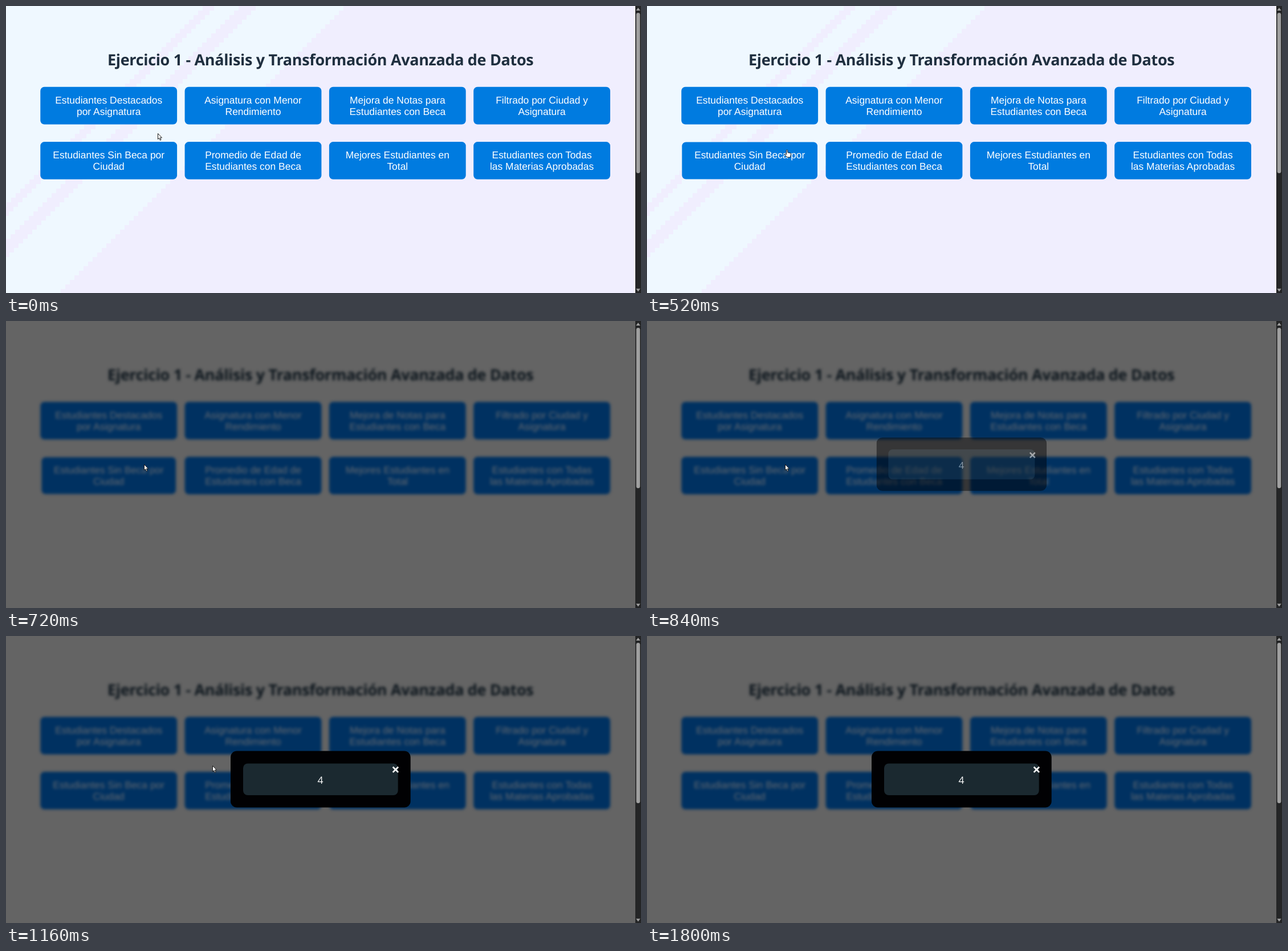
Write an HTML page that moves like this. It is 1114 by 503 pixels and loops after 2.04 s.

```html
<!DOCTYPE html>
<html lang="es">
<head>
<meta charset="utf-8">
<title>Ejercicio 1</title>
<style>
  html, body { margin: 0; width: 100%; height: 100%; overflow: hidden; background: #f0eefe; }
  svg { display: block; width: 1114px; height: 503px; }
  text { text-anchor: middle; text-rendering: geometricPrecision; }
  #sky { fill: #eff8ff; }
  #title { font: 700 27px "Open Sans", "Noto Sans", sans-serif; letter-spacing: -.33px; fill: #1f2f3f; }
  .button rect { fill: #007be0; }
  .button text { font: 17.45px "Liberation Sans", Arial, sans-serif; fill: #fff; }
  .dim #backdrop { fill: #646464; }
  .dim #sky { display: none; }
  .dim #page { filter: blur(2.4px); }
  .dim #title { fill: #0d161d; }
  .dim .button rect { fill: #003161; }
  .dim .button text { fill: #656a70; }
  #answer { font: 17.5px "Open Sans", "Noto Sans", sans-serif; fill: #fff; }
  .pointer { fill: #fff; stroke: #1b1b1b; stroke-width: 1; stroke-linejoin: round; }
</style>
</head>
<body>
<svg id="stage" viewBox="0 0 1114 503">
  <rect id="backdrop" width="1104" height="503" fill="#f0eefe"/>
  <path id="sky"/>
  <g id="page">
    <text id="title" x="551.7" y="104.3">Ejercicio 1 - Análisis y Transformación Avanzada de Datos</text>
  </g>
  <g id="modal">
    <rect x="394" y="201.5" width="315.7" height="99" rx="11" fill="#010103"/>
    <rect x="416" y="223.5" width="271.7" height="55.5" rx="8" fill="#1b2930"/>
    <text id="answer" x="551.5" y="259">4</text>
    <path d="M678.7 229.5l9.4 9.4m0-9.4l-9.4 9.4" stroke="#fff" stroke-width="2.7"/>
  </g>
  <g id="scrollbar">
    <rect x="1104" width="10" height="503" fill="#242526"/>
    <rect x="1105.7" y="12" width="6.6" height="281" rx="3.3" fill="#a0a0a0"/>
    <path d="M1105.3 8l3.7-5 3.7 5zM1105.3 495.5l3.7 5 3.7-5z" fill="#a0a0a0"/>
  </g>
  <g id="cursor">
    <path id="arrow" class="pointer" d="M0 0V10l2.2-2 1.7 3.8 1.6-.8-1.6-3.6H7z"/>
    <path id="hand" class="pointer" d="M2 1.2q1.2-1.2 2.2 0v4l4.6 1q1.3.4 1.2 1.8l-1 5.6H3.4L-.8 9q0-1.4 1.2-1.2L2 8.8z"/>
  </g>
</svg>
<script>
const LOOP = 2040, STEP = 40;
const SVG_NS = "http://www.w3.org/2000/svg";
const $ = id => document.getElementById(id);

function add(parent, tag, attrs, content = "") {
  const node = document.createElementNS(SVG_NS, tag);
  for (const key in attrs) node.setAttribute(key, attrs[key]);
  node.textContent = content;
  parent.append(node);
  return node;
}

// Diagonal bands with stepped edges, measured along x + y.
function drawSky() {
  const cell = 8, bands = [[0, 345], [365, 408], [438, 592]];
  let d = "";
  for (let y = 0; y < 503; y += cell) {
    for (const [from, to] of bands) {
      const left = Math.max(0, from - y), right = to - y;
      if (right > left) d += `M${left} ${y}H${right}v${cell}H${left}z`;
    }
  }
  $("sky").setAttribute("d", d);
}

const labels = [
  ["Estudiantes Destacados", "por Asignatura"],
  ["Asignatura con Menor", "Rendimiento"],
  ["Mejora de Notas para", "Estudiantes con Beca"],
  ["Filtrado por Ciudad y", "Asignatura"],
  ["Estudiantes Sin Beca por", "Ciudad"],
  ["Promedio de Edad de", "Estudiantes con Beca"],
  ["Mejores Estudiantes en", "Total"],
  ["Estudiantes con Todas", "las Materias Aprobadas"]
];

const buttons = labels.map((lines, i) => {
  const x = 60.3 + 253.3 * (i % 4), y = 141.8 + 96.3 * Math.floor(i / 4);
  const group = add($("page"), "g", { class: "button" });
  add(group, "rect", { x, y, width: 239.8, height: 65.7, rx: 7 });
  lines.forEach((line, n) =>
    add(group, "text", { x: x + 119.9, y: y + 29 + 19.8 * n }, line));
  return group;
});

const clamp = v => Math.min(1, Math.max(0, v));
const mix = (a, b, k) => a + (b - a) * k;

// CSS "ease": cubic-bezier(.25, .1, .25, 1)
function ease(v) {
  const p = clamp(v);
  const bezier = (a, b, u) => 3 * a * u * (1 - u) ** 2 + 3 * b * u * u * (1 - u) + u ** 3;
  let low = 0, high = 1;
  for (let i = 0; i < 20; i++) {
    const mid = (low + high) / 2;
    if (bezier(.25, .25, mid) < p) low = mid; else high = mid;
  }
  return bezier(.1, 1, low);
}

const linear = k => k;
const easeIn = k => k * k;
const easeOut = k => 1 - (1 - k) ** 2;
const smooth = k => k * k * (3 - 2 * k);

// time, x, y, easing towards this point
const route = [
  [0, 266.5, 223.5],
  [440, 242.5, 251.5, smooth],
  [960, 242.5, 251.5, linear],
  [1160, 362.5, 227.5, easeIn],
  [1520, 444, 179, easeOut],
  [1680, 444, 179, linear],
  [1800, 509, -20, linear],
  [LOOP, 509, -20, linear]
];

function cursorAt(t) {
  const i = route.findIndex((point, n) => n > 0 && t <= point[0]);
  const [t0, x0, y0] = route[i - 1], [t1, x1, y1, easing] = route[i];
  const k = easing((t - t0) / (t1 - t0));
  return [mix(x0, x1, k), mix(y0, y1, k)];
}

function scaleAbout(node, x, y, s) {
  node.setAttribute("transform", `translate(${x} ${y}) scale(${s}) translate(${-x} ${-y})`);
}

function render(t) {
  const dim = t >= 720;
  $("stage").classList.toggle("dim", dim);

  const pressed = ease((t - 480) / 200) - ease((t - 670) / 200);
  scaleAbout(buttons[4], 180.2, 270.9, 1 - .03 * pressed);

  const shown = ease((t - 758) / 300);
  $("modal").setAttribute("opacity", shown);
  scaleAbout($("modal"), 551.8, 251, .9 + .1 * shown);

  const [x, y] = cursorAt(t);
  const pointing = y > 238 && t < 640;
  $("cursor").setAttribute("transform", `translate(${x} ${y})`);
  $("hand").style.display = pointing ? "" : "none";
  $("arrow").style.display = pointing ? "none" : "";
}

drawSky();
const start = performance.now();
function tick() {
  const t = (performance.now() - start) % LOOP;
  render(Math.floor(t / STEP) * STEP);
  requestAnimationFrame(tick);
}
tick();
</script>
</body>
</html>
```
